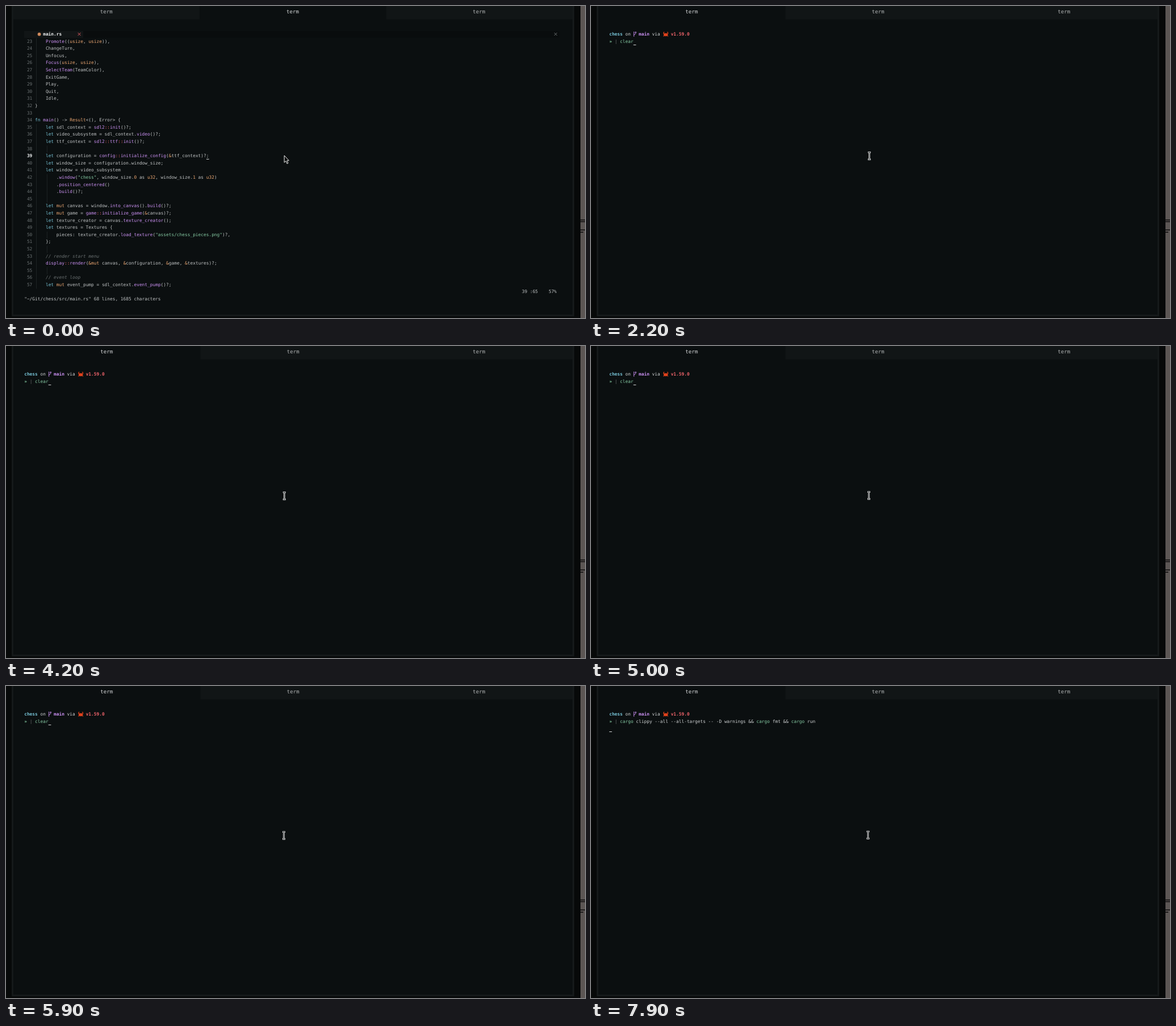
Recreate the animation shown at these times as an HTML page. Size 1020 by 549 pixels, loop 8 s.

```html
<!DOCTYPE html>
<html lang="en">
<head>
<meta charset="utf-8">
<title>Terminal session</title>
<style>
  html, body { margin: 0; width: 100%; height: 100%; overflow: hidden; background: #070909; }
  svg { position: absolute; left: 0; top: 0; }
  pre, text { font-family: "DejaVu Sans Mono", "Noto Sans Mono", monospace; text-rendering: geometricPrecision; }
  pre {
    position: absolute; left: 32.2px; top: 44.1px; margin: 0;
    font-size: 7.84px; line-height: 12.595px; color: #bfc2c3;
    font-variant-ligatures: none;
  }
  pre.shell { color: #cdd0d1; }
  text { font-size: 9.1px; text-anchor: middle; fill: #b0b3b4; }
  text.on { fill: #d5d8d9; }
  b { color: #f0f2f3; }
  .comment { color: #6a7071; font-style: italic; }
  .string, .command { color: #86cba4; }
  .keyword, .dir { color: #77c3d6; }
  .type, .ref { color: #eba671; }
  .path, .version, .unknown { color: #ee636a; }
  .call, .branch { color: #ca90f1; }
  .number, .hint, .bar { color: #6c7273; }
  .in-shell .editor, .in-editor .shell { display: none; }
</style>
</head>
<body class="in-editor">
<svg width="1020" height="549">
  <rect x="10" width="991" height="546" fill="#15191a"/>
  <rect x="13" width="985" height="543" fill="#0b0f10"/>
  <rect x="1012" width="8" height="549" fill="#5c5654"/>
  <path d="M1012 376.5h8M1012 379.5h8M1012 394h8M1012 398h5" stroke="#0a0a0a" stroke-width="1.5"/>
  <g class="editor">
    <path d="M13 0H341V23.5H13zM670 0H998V23.5H670z" fill="#111516"/>
    <text x="176.7" y="12.5">term</text>
    <text x="505" y="12.5" class="on">term</text>
    <text x="833.3" y="12.5">term</text>
    <rect x="32" y="44" width="943" height="12" fill="#090c0d"/>
    <rect x="32" y="44" width="104" height="12" fill="#111516"/>
    <circle cx="58.6" cy="49.7" r="2.9" fill="#d08a5c"/>
    <path d="M126.6 47l5 5m0-5l-5 5" stroke="#df5b61"/>
    <path d="M965.8 47l5 5m0-5l-5 5" stroke="#85898a" stroke-width=".8"/>
    <g id="guides" fill="#1f2526"></g>
    <rect x="353" y="269" width="4.7" height="1" fill="#d5d8d9"/>
  </g>
  <g class="shell">
    <rect x="342.5" width="655.5" height="23.5" fill="#111516"/>
    <text x="177.3" y="12.5" class="on">term</text>
    <text x="505.8" y="12.5">term</text>
    <text x="833.3" y="12.5">term</text>
    <path d="M75.6 45v9M75.6 51.5q0-1.5 1.6-1.8t1.6-1.7v-2M77 47l1.8-1.8 1.2 1.8" fill="none" stroke="#ca90f1" stroke-width=".9"/>
    <g fill="#e0421c" stroke="#e0421c">
      <ellipse cx="131.7" cy="50.5" rx="3.2" ry="2.3"/>
      <path d="M128.8 50l-1-2 1-2.4M134.6 50l1-2-1-2.4M129 51.5l-1.3 2M134.4 51.5l1.3 2" fill="none" stroke-width="1.3"/>
    </g>
  </g>
</svg>
<pre class="editor" id="code"></pre>
<pre class="shell"><b class="dir">chess</b> on   <b class="branch">main</b> via    <b class="version">v1.59.0</b>
<b class="command">»</b> <span class="bar">|</span> <span id="prompt"></span></pre>
<svg width="1020" height="549">
  <path class="editor" d="M490.2 263v12.3l2.8-2.6 2 4.7 2-.9-2-4.5h3.4z" fill="#080a0a" stroke="#f0f0f0"/>
  <g class="shell">
    <rect id="cursor" height="1" width="4.7" fill="#d5d8d9"/>
    <rect id="box" x="51.5" y="56.5" width="4" height="11" fill="none" stroke="#d5d8d9"/>
    <g id="beam" fill="none">
      <path d="M-2.5-6.2H2.5M0-6.2V6.2M-2.5 6.2H2.5" stroke="#f0f0f0" stroke-width="2.6"/>
      <path d="M-2-6.2H2M0-6.2V6.2M-2 6.2H2" stroke="#0b0f10" stroke-width=".8"/>
    </g>
  </g>
</svg>
<script>
const LOOP = 8000, LEFT = 32.2, TOP = 44.1, CELL = 4.72, ROW = 12.595;
const FIRST_LINE = 23, CURRENT_LINE = 39;
const $ = id => document.getElementById(id);
const escapeHtml = s => s.replace(/&/g, '&amp;').replace(/</g, '&lt;').replace(/>/g, '&gt;');
const span = (kind, text) => `<span class="${kind}">${text}</span>`;

const source = `    Promote((usize, usize)),
    ChangeTurn,
    Unfocus,
    Focus(usize, usize),
    SelectTeam(TeamColor),
    ExitGame,
    Play,
    Quit,
    Idle,
}

fn main() -> Result<(), Error> {
    let sdl_context = sdl2::init()?;
    let video_subsystem = sdl_context.video()?;
    let ttf_context = sdl2::ttf::init()?;

    let configuration = config::initialize_config(&ttf_context)?;
    let window_size = configuration.window_size;
    let window = video_subsystem
        .window("chess", window_size.0 as u32, window_size.1 as u32)
        .position_centered()
        .build()?;

    let mut canvas = window.into_canvas().build()?;
    let mut game = game::initialize_game(&canvas)?;
    let texture_creator = canvas.texture_creator();
    let textures = Textures {
        pieces: texture_creator.load_texture("assets/chess_pieces.png")?,
    };

    // render start menu
    display::render(&mut canvas, &configuration, &game, &textures)?;

    // event loop
    let mut event_pump = sdl_context.event_pump()?;`;

const syntax = /(?<comment>\/\/.*)|(?<string>"[^"]*")|\b(?<keyword>fn|let)\b|\b(?<type>mut|usize|u32|Result|[01](?= as))\b|(?<ref>&amp;)|(?<path>::)|(?<call>\w+(?=\(|::))/g;

function highlight(line) {
  return escapeHtml(line).replace(syntax, (text, ...rest) => {
    const groups = rest.at(-1);
    return span(Object.keys(groups).find(kind => groups[kind]), text);
  });
}

const numbered = source.split('\n').map((line, i) => {
  const n = FIRST_LINE + i;
  return ` ${n === CURRENT_LINE ? `<b>${n}</b>` : span('number', n)} ${highlight(line)}`;
});
$('code').innerHTML = [
  ' '.repeat(7) + '<b>main.rs</b>',
  ...numbered,
  ' '.repeat(186) + '39 :65    57%',
  '"~/Git/chess/src/main.rs" 68 lines, 1685 characters',
].join('\n');

// Indent guides: column, first line, line count
$('guides').innerHTML = [[4, 23, 9], [4, 35, 23], [8, 38, 1], [8, 42, 4], [8, 50, 1], [8, 52, 1], [8, 55, 1]]
  .map(([col, line, count]) =>
    `<rect x="${LEFT + (col + .4) * CELL}" y="${TOP + (line - FIRST_LINE + 1) * ROW}" width="1" height="${count * ROW}"/>`)
  .join('');

// Start time, typed command, suggested completion
const build = 'cargo clippy --all --all-targets -- -D warnings && cargo fmt && cargo run';
const commands = [
  [0, ''], [2200, 'clear'], [3400, 'git push'], [3700, 'git commit -m "update"'],
  [3900, 'git push'], [4200, 'clear'], [4400, ''], [4800, 'c', 'lear'],
  [5000, 'clear'], [5600, build], [5900, 'clear'], [6400, build],
];
const beamSpots = [[0, 490.3, 263.7], [5000, 489.5, 262.9], [7100, 488.7, 262.9], [7900, 488, 262.2]];
const current = (list, t) => list.findLast(([start]) => t >= start);

const paint = (typed, hint) => hint
  ? span('unknown', typed) + span('hint', hint)
  : escapeHtml(typed).replace(/(^|&amp;&amp; )(\w+)/g, (_, before, name) => before + span('command', name));

let shown;
function draw() {
  const t = performance.now() % LOOP;
  document.body.className = t < 1500 ? 'in-editor' : 'in-shell';

  const command = current(commands, t);
  const [, typed, hint] = command;
  if (command !== shown) $('prompt').innerHTML = paint(typed, hint);
  shown = command;

  const entered = t >= 7400, unfocused = t < 1600;
  $('cursor').setAttribute('x', LEFT + (entered ? 0 : 4 + typed.length) * CELL);
  $('cursor').setAttribute('y', entered ? 80 : 68);
  $('cursor').style.display = unfocused ? 'none' : '';
  $('box').style.display = unfocused ? '' : 'none';

  const [, x, y] = current(beamSpots, t);
  $('beam').setAttribute('transform', `translate(${x} ${y})`);
  requestAnimationFrame(draw);
}
draw();
</script>
</body>
</html>
```
